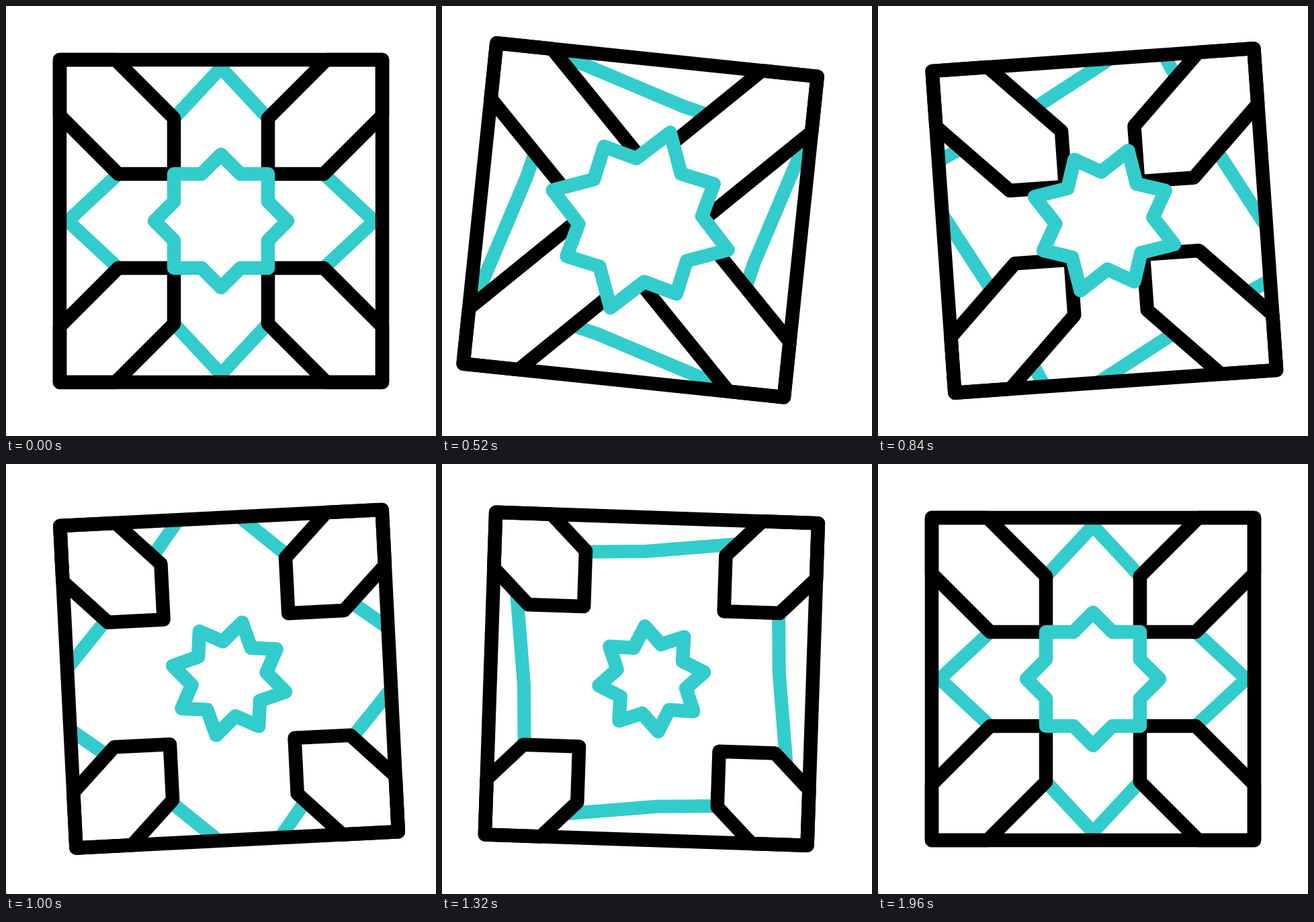
Recreate the animation shown at these times as an HTML page with a canvas. Size 640 by 640 pixels, loop 2000 ms.

```html
<!DOCTYPE html>
<html lang="en">
<head>
<meta charset="utf-8">
<title>Swinging tile</title>
<style>
  html, body { margin: 0; width: 100%; height: 100%; overflow: hidden; background: #fff; }
  canvas { display: block; width: 640px; height: 640px; }
</style>
</head>
<body>
<canvas id="stage" width="640" height="640"></canvas>
<script>
const ctx = document.getElementById('stage').getContext('2d');
const LOOP = 2000, STEP = 40;
const TEAL = '#33cccc', BLACK = '#000', WHITE = '#fff';
const HALF = 240, LINE = 20.5, STAR = 99;
const RAD = Math.PI / 180;

// Eased 0..1 between steps a and b.
function ramp(k, a, b) {
  const u = Math.min(1, Math.max(0, (k - a) / (b - a)));
  return u * u * (3 - 2 * u);
}

// From zero out to a peak, over to a dip, and back to zero.
function sway(k, peak, dip, a = 1, b = 14, c = 29, d = 44.6) {
  return peak * ramp(k, a, b) + (dip - peak) * ramp(k, b, c) - dip * ramp(k, c, d);
}

function swing(k) {
  return 7 * ramp(k, 1, 11) + sway(k, -11.1, -5, 11, 21.5, 33.7, 46.4)
    - 7 * ramp(k, 33.7, 46.4);
}

function polygon(points, color, width, fill) {
  ctx.beginPath();
  points.forEach(([x, y]) => ctx.lineTo(x, y));
  ctx.closePath();
  if (fill) {
    ctx.fillStyle = fill;
    ctx.fill();
  }
  ctx.strokeStyle = color;
  ctx.lineWidth = width;
  ctx.stroke();
}

// Points around the centre, clockwise from the top, cycling through the radii.
function spokes(count, radii, turn) {
  return Array.from({ length: count }, (_, i) => {
    const a = i * 2 * Math.PI / count + turn * RAD;
    const r = radii[i % radii.length];
    return [r * Math.sin(a), -r * Math.cos(a)];
  });
}

function drawRing(k) {
  const r = 228 * (1 + 0.27 * (ramp(k, 1, 22) - ramp(k, 29, 44)));
  ctx.save();
  ctx.beginPath();
  ctx.rect(-HALF, -HALF, 2 * HALF, 2 * HALF);
  ctx.clip();
  polygon(spokes(8, [r, r * 0.682], -180 * ramp(k, 1, 47.2)), TEAL, 20);
  ctx.restore();
}

function drawCorners(k) {
  const d = sway(k, 62, -41), near = d - 70, far = d - 153, edge = -157;
  const shape = [[-HALF, -HALF], [edge, -HALF], [near, far], [near, near], [far, near], [-HALF, edge]];
  for (const sx of [-1, 1]) {
    for (const sy of [-1, 1]) {
      polygon(shape.map(([x, y]) => [x * sx, y * sy]), BLACK, LINE, WHITE);
    }
  }
}

function drawStar(k) {
  const axis = STAR + sway(k, 39.5, -24);
  const diagonal = STAR + sway(k, 23.5, -24);
  const inner = STAR * 0.765 + sway(k, 16.5, -27);
  const turn = sway(k, 23, -14, 4.3, 20.4, 36.7, 49);
  polygon(spokes(16, [axis, inner, diagonal, inner], turn), TEAL, LINE, WHITE);
}

function draw(k) {
  ctx.setTransform(1, 0, 0, 1, 0, 0);
  ctx.fillStyle = WHITE;
  ctx.fillRect(0, 0, 640, 640);
  ctx.lineJoin = 'round';
  // The tile hangs from the middle of its top edge.
  ctx.translate(320, 80);
  ctx.rotate(swing(k) * RAD);
  ctx.translate(0, HALF);
  drawRing(k);
  drawCorners(k);
  polygon(spokes(4, [HALF * Math.SQRT2], 45), BLACK, LINE);
  drawStar(k);
}

const start = performance.now();
function tick() {
  const t = (performance.now() - start) % LOOP;
  draw(Math.floor(t / STEP));
  requestAnimationFrame(tick);
}
tick();
</script>
</body>
</html>
```
